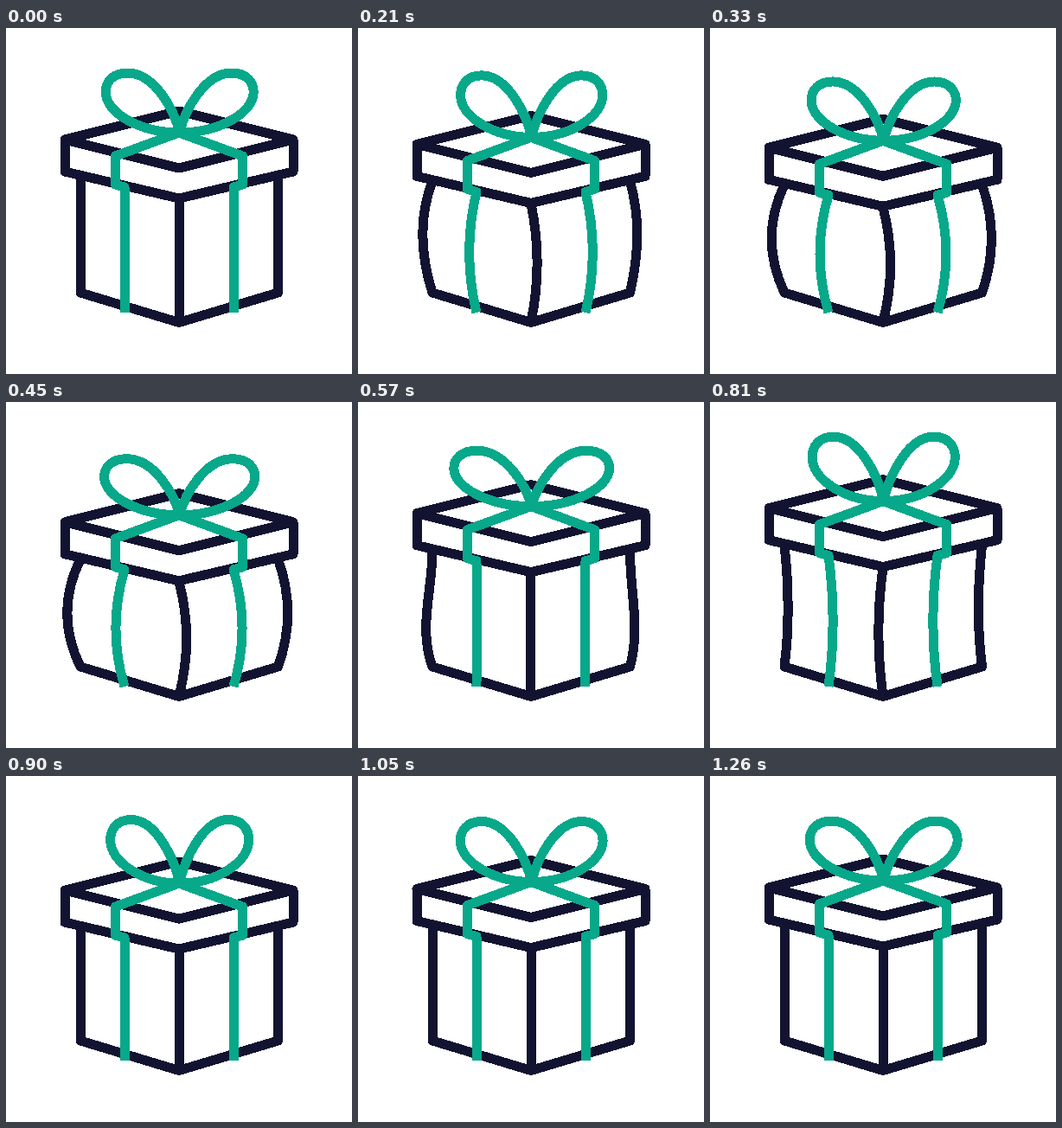
Animation of 400 by 400 pixels, one loop 3.32 s. Source, as an HTML page:

```html
<!DOCTYPE html>
<html lang="en">
<head>
<meta charset="utf-8">
<title>Gift box</title>
<style>
  html, body { margin: 0; width: 100%; height: 100%; overflow: hidden; background: #fff; }
  svg { display: block; width: 100%; height: 100%; }
  path { fill: none; stroke-width: 11; stroke-linejoin: round; shape-rendering: crispEdges; }
  .dark { stroke: #121331; stroke-linecap: round; }
  .green { stroke: #08a88a; }
</style>
</head>
<body>
<svg viewBox="0 0 400 400">
  <path id="box" class="dark"/>
  <path id="lid" class="dark" d="M200 96L332 129L200 162L68 129ZM68 129V166L200 197L332 166V129"/>
  <path id="ribbon" class="green"/>
  <path id="bow" class="green"/>
</svg>
<script>
const LOOP = 3320, STEP = 30, LANDING = 850, REST = 1260;

// Key points: time, value, optional lateness of the ease that leads there
const hopKeys = [[0, 0], [400, 10], [700, -21, 1.65], [LANDING, 0, 1.5]];
const stretchKeys = [[0, 0], [120, .05], [540, -.07], [810, .08], [1140, 0]];

const el = id => document.getElementById(id);
const box = el("box"), lid = el("lid"), ribbon = el("ribbon"), bow = el("bow");

function track(keys, t) {
  const i = keys.findIndex(k => k[0] > t);
  if (i < 0) return keys[keys.length - 1][1];
  if (i === 0) return keys[0][1];
  const [t0, v0] = keys[i - 1], [t1, v1, late = 1] = keys[i];
  const u = ((t - t0) / (t1 - t0)) ** late;
  return v0 + (v1 - v0) * Math.sin(u * Math.PI / 2) ** 2;
}

const hop = t => track(hopKeys, t);
const stretch = t => track(stretchKeys, t);

// Fading wobble of the lid after it lands
function settle(t) {
  const u = (t - LANDING) / (REST - LANDING);
  return u > 0 && u < 1 ? 6.5 * (1 - u) ** 1.5 * Math.sin(1.6 * Math.PI * u) : 0;
}

// Walls bulge as the lid presses down and cave in as it lifts
function bulge(t, out, caved) {
  const h = hop(t);
  return Math.tanh(h / 5) * (h > 0 ? out : caved);
}

// Curve from (x, y0) down to (x, y1), pushed sideways by p above and q below
function bend(x, y0, y1, p, q) {
  const d = (y1 - y0) / 3;
  return `C${x + p} ${y0 + d} ${x + q} ${y1 - d} ${x} ${y1}`;
}

// Outer wall: its lower half follows the upper half a little later
function wall(x, y, t, dir, out) {
  const p = dir * bulge(t, out, 6), q = dir * bulge(t - 40, out, 6);
  return `M${x} ${172 + y}` + bend(x, 172 + y, 306, p, q);
}

function loop(dir, y, w, h) {
  const at = (dx, dy) => `${200.7 + dir * dx * w} ${y - dy * h}`;
  return `M${at(0, 0)}C${at(6, 26)} ${at(29, 69)} ${at(60, 69)}`
    + `C${at(78, 69)} ${at(85.5, 58)} ${at(85.5, 47)}`
    + `C${at(85.5, 23)} ${at(46, 0)} ${at(0, 0)}`;
}

function band(dir, y, push) {
  const x = dx => 200 + dir * dx;
  return `M200 ${121 + y}L${x(73.5)} ${148 + y}V${181 + y}L${x(63)} ${184 + y}`
    + bend(x(63), 184 + y, 329, dir * push, dir * push);
}

function draw(t) {
  const y = hop(t) + settle(t);
  const front = bulge(t, 12, 8), push = bulge(t, 14, 8);
  const w = 1 - .8 * stretch(t - 90), h = 1 + stretch(t);
  lid.setAttribute("transform", `translate(0 ${y})`);
  box.setAttribute("d",
    wall(86, y, t, -1, 21) + "L200 340.5L314.5 306" + wall(314.5, y, t, 1, 15.5)
    + `M200 ${198 + y}` + bend(200, 198 + y, 340, front, front));
  ribbon.setAttribute("d", band(-1, y, push) + band(1, y, push));
  bow.setAttribute("d", loop(-1, 121 + y, w, h) + loop(1, 121 + y, w, h));
}

const start = performance.now();
function tick() {
  const t = (performance.now() - start) % LOOP;
  draw(Math.floor(t / STEP) * STEP);
  requestAnimationFrame(tick);
}
draw(0);
requestAnimationFrame(tick);
</script>
</body>
</html>
```
